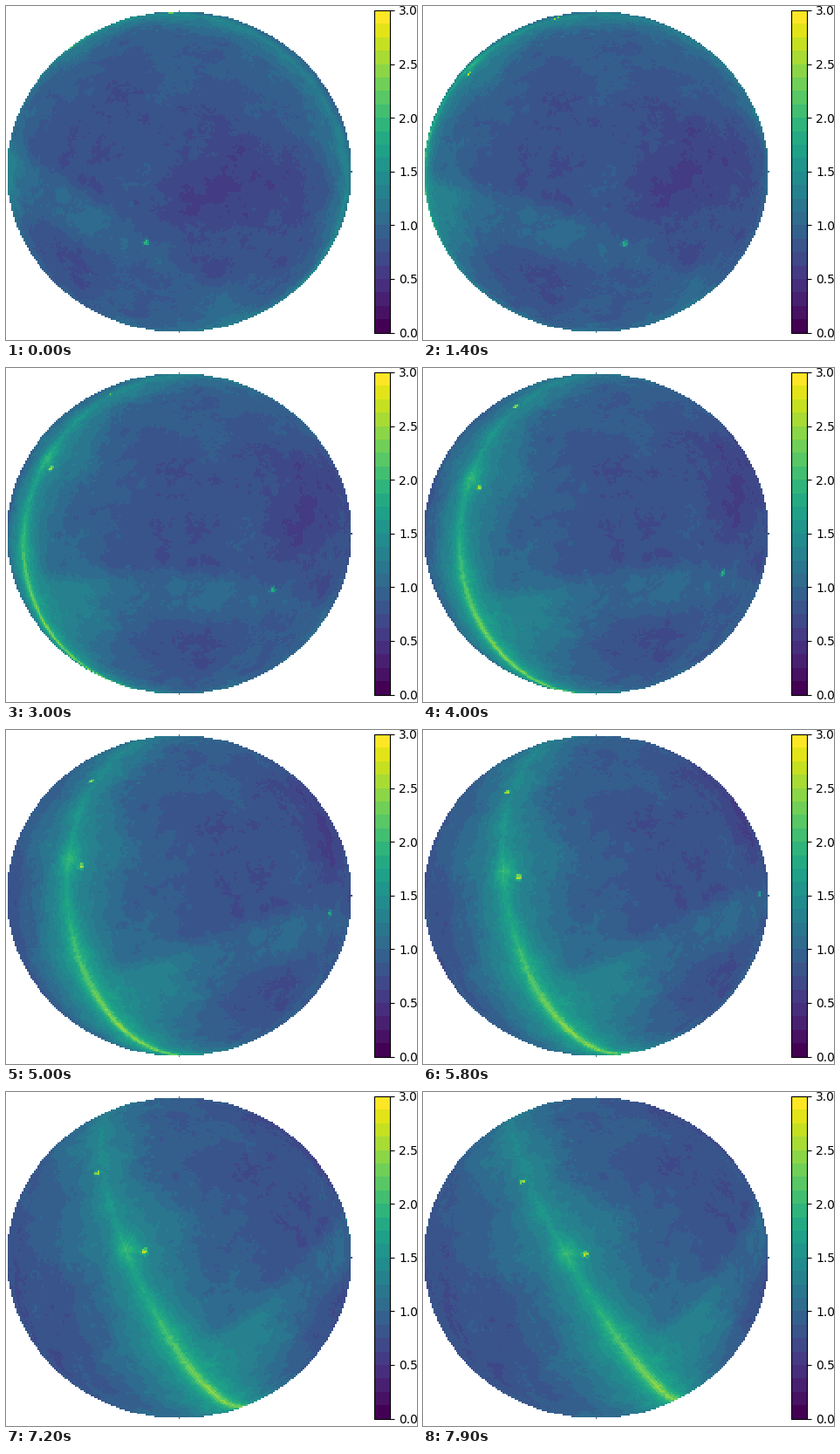
Animation of 471 by 383 pixels, one loop 8000 ms. Source, as a matplotlib script:

```python
import numpy as np
import matplotlib.pyplot as plt
from matplotlib.animation import FuncAnimation

W, H, DPI = 471, 383, 100
FRAMES, STEP_MS = 80, 100
LAT = np.radians(39.5)
LST0, LST_STEP = 176.4, 1.5          # degrees
HALF = 100                           # disc radius in grid cells
CELL = np.radians(0.916)             # sky cell size
LEVELS = 24


def unit(lon, lat):
    lon, lat = np.radians(lon), np.radians(lat)
    return np.array([np.cos(lat) * np.cos(lon),
                     np.cos(lat) * np.sin(lon),
                     np.sin(lat) + 0 * lon])


def galactic_rotation():
    """Equatorial -> galactic, from the galactic pole and centre."""
    pole, centre = unit(192.86, 27.13), unit(266.4, -28.94)
    return np.array([centre, np.cross(pole, centre), pole])


def sep(vecs, v):
    """Angular distance in degrees."""
    return np.degrees(np.arccos(np.clip(np.tensordot(v, vecs, 1), -1, 1)))


def bump(vecs, v, size):
    return np.exp(-0.5 * (sep(vecs, v) / size) ** 2)


def cloud_noise(vecs, rng, n=160, box=2.5):
    """Fractal noise from a random cube, sampled on the unit sphere."""
    f = np.fft.fftfreq(n) * n
    k2 = (f[:, None, None] ** 2 + f[None, :, None] ** 2
          + np.arange(n // 2 + 1) ** 2)
    cube = np.fft.rfftn(rng.standard_normal((n, n, n)))
    cube = np.fft.irfftn(cube * (k2 + 5) ** -0.95, s=(n, n, n), axes=(0, 1, 2))
    i, j, k = np.floor((vecs / box + 0.5) * n).astype(int)
    field = cube[i, j, k]
    return (field - field.mean()) / field.std()


# sky cells: rings of near-equal patches in galactic coordinates
GAL = galactic_rotation()
RINGS = int(round(np.pi / CELL))
ring_b = (np.arange(RINGS) + 0.5) / RINGS * np.pi - np.pi / 2
ring_n = np.maximum(1, np.round(2 * np.pi * np.cos(ring_b) / CELL)).astype(int)
ring_start = np.cumsum(ring_n) - ring_n


def cell_index(v):
    b = np.arcsin(np.clip(v[2], -1, 1))
    turn = np.arctan2(v[1], v[0]) / (2 * np.pi) % 1
    ring = np.clip(((b / np.pi + 0.5) * RINGS).astype(int), 0, RINGS - 1)
    n = ring_n[ring]
    return ring_start[ring] + np.minimum((turn * n).astype(int), n - 1)


def disc_and_halo(l, b):
    ab = np.abs(b)
    inner = (1 + np.cos(np.radians(l))) / 2
    return (0.73 + (0.5 + 0.3 * inner) * np.exp(-ab / 22)
            + (0.1 + 0.4 * inner ** 2) * np.exp(-ab / 6)
            + 0.42 * inner ** 6 * np.exp(-(b / 1.9) ** 2))


def arc(v, l, b):
    """Rim of a large bubble, fading away from the disc."""
    off = sep(v, unit(329, 17.5)) - 59
    width = np.where(off > 0, 4.5, 13)
    fade = np.cos(np.radians((l - 30 + 180) % 360 - 180) / 2)
    rise = 1 / (1 + np.exp(-(b - 12) / 6))
    return 0.3 * fade * rise * np.exp(-0.5 * (off / width) ** 2)


def build_sky():
    rng = np.random.default_rng(12)
    b = np.degrees(np.repeat(ring_b, ring_n))
    l = np.concatenate([(np.arange(n) + 0.5) / n * 360 for n in ring_n])
    v = unit(l, b)

    log_t = disc_and_halo(l, b) + arc(v, l, b)
    log_t -= 0.17 * bump(v, unit(195, 42), 15)      # cold patch
    log_t += 0.3 * bump(v, unit(79, 1), 3.2)        # bright knot in the disc
    log_t -= 0.3 * bump(v, unit(0, 90), 0.5)        # dark dot at the pole
    log_t += 0.05 * cloud_noise(v, rng) + 0.01 * rng.standard_normal(l.size)

    temp = 10 ** log_t
    for ra, dec, amp in [(350.85, 58.8, 550), (299.87, 40.73, 600),
                         (187.7, 12.4, 120)]:
        temp += amp * bump(v, GAL @ unit(ra, dec), 0.5)
    faint = rng.integers(0, l.size, 20)
    temp[faint] += rng.uniform(2, 8, faint.size)
    return np.log10(temp)


sky = build_sky()

# visible hemisphere: x to the west, y to the north, z to the zenith
axis = np.arange(-HALF, HALF + 1) / HALF
gx, gy = np.meshgrid(axis, axis)
inside = (gx ** 2 + gy ** 2 <= 1 + 1e-9) & (gx > -1)
x, y = gx[inside], gy[inside]
z = np.sqrt(np.maximum(0, 1 - x ** 2 - y ** 2))
to_equator = z * np.cos(LAT) - y * np.sin(LAT)
to_pole = y * np.cos(LAT) + z * np.sin(LAT)


def view(i):
    lst = np.radians(LST0 + LST_STEP * i)
    c, s = np.cos(lst), np.sin(lst)
    eq = np.array([to_equator * c + x * s, to_equator * s - x * c, to_pole])
    img = np.full(gx.shape, np.nan)
    img[inside] = sky[cell_index(GAL @ eq)]
    return img


def px_axes(left, bottom, width, height):
    return fig.add_axes([left / W, bottom / H, width / W, height / H])


fig = plt.figure(figsize=(W / DPI, H / DPI), dpi=DPI, facecolor="white")
ax = px_axes(0.2, 8.4, 396.8, 369.6)
ax.axis("off")
image = ax.imshow(view(0), cmap=plt.get_cmap("viridis", LEVELS), vmin=0, vmax=3,
                  origin="lower", interpolation="nearest", aspect="auto")
bar = fig.colorbar(image, cax=px_axes(421.8, 8.4, 18.5, 369.6))
ticks = np.arange(0, 3.1, 0.5)
bar.set_ticks(ticks)
bar.ax.set_yticklabels([f"{t:.1f}" for t in ticks],
                       family="DejaVu Sans", size=10)


def update(i):
    image.set_data(view(i))
    return [image]


anim = FuncAnimation(fig, update, frames=FRAMES, interval=STEP_MS,
                     repeat=True, repeat_delay=0, blit=False)
plt.show()
```
